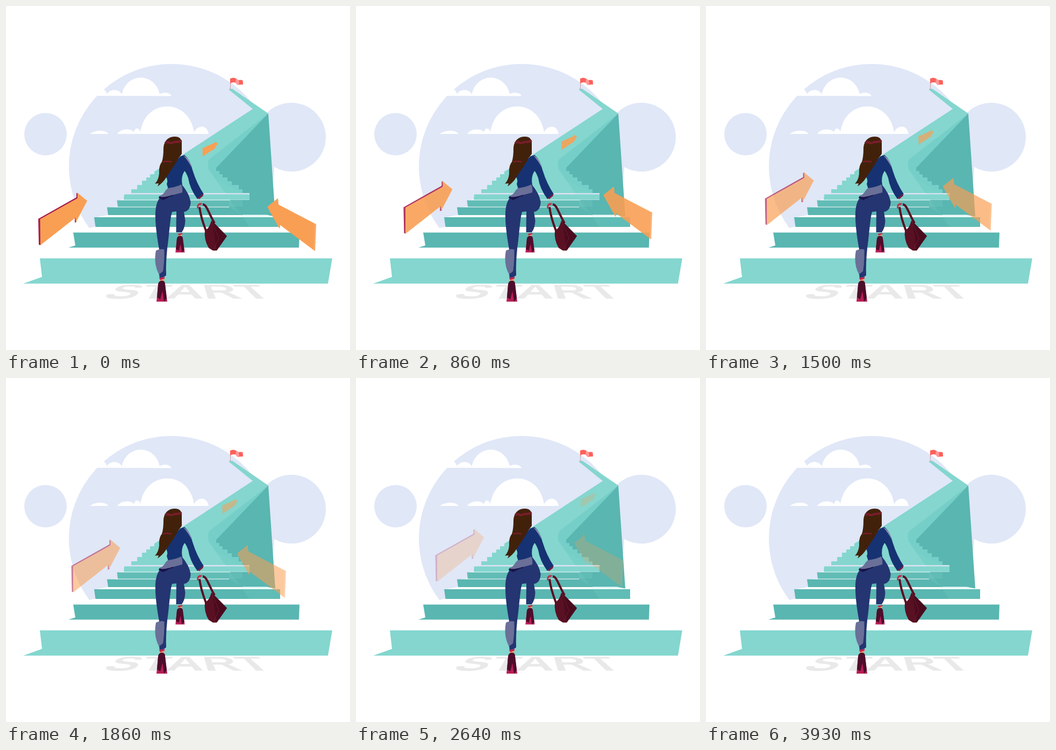
An HTML page for the animation above (4 s loop, 640 by 640 pixels).

```html
<!DOCTYPE html>
<html lang="en">
<head>
<meta charset="utf-8">
<title>Climb</title>
<style>
  html, body { margin: 0; width: 100%; height: 100%; overflow: hidden; background: #fff; }
  svg { position: absolute; left: 0; top: 0; }
  #floor {
    width: 1px; height: 1px; overflow: visible; transform-origin: 0 0;
    transform: translate(339px, 544.5px) matrix3d(1.01,0,0,0, 0,.467,0,-.0037, 0,0,1,0, 0,0,0,1);
    font: bold 100px "Liberation Sans", Arial, sans-serif;
  }
</style>
</head>
<body>
<svg id="floor"><text text-anchor="middle" fill="#e9e9e9">START</text></svg>

<svg width="640" height="640" viewBox="0 0 640 640">
  <!-- sky -->
  <g fill="#e0e7f7">
    <circle cx="73.500" cy="238.500" r="39.500"/>
    <circle cx="531" cy="244" r="64"/>
    <path d="M155 413A191 191 0 1 1 461 413Z"/>
  </g>
  <g fill="#fff">
    <path d="M160 167V155H182Q186 158 188 164C193 154 210 153 215.500 164.500C224 123 277 123 286 164C292 160 304 160 308 167.500Z"/>
    <path d="M156 238C166 230 186 230 190.500 238ZM207 238C212 229 231 226 238 234.500C240 226 247 225 250 234C260 171 340 171 350 234.500C357 221 374 220 377 238Z"/>
  </g>

  <!-- ramp and wall -->
  <path fill="#84d6cf" d="M415 154H421L488 200L440 348H233V341H244V333H253V325H261V319H268V313H276V308L330 276L459 191.500L415 156Z"/>
  <path fill="#75cfc8" d="M488 200L378 285Q374 292 377 304L408 348H453V300Z"/>
  <path fill="#59b6b1" d="M488 200L501 391.500L485 389H415V361H453V348H440V341H433V333H420V326H412V319H403V313H397V307H391V301Z"/>

  <!-- steps -->
  <path fill="#fff" d="M233 348.500H440V350H453V361H417V374.500H415V389H485L510 393.500V411H546V422H607V470H63L125 421L154 413L164 393L188 389V375L207 373V361L220 360V350Z" opacity="0"/>
  <path fill="#e0e0ef" d="M233 348.500H440V350.500H231Z"/>
  <path fill="#fff" d="M220 359.500H417V362H207ZM207 373H415V375.500H188ZM190 388.500H485L510 394H164ZM166 410.500H510L546 422H125L155 413Z"/>
  <path fill="#82d5ce" d="M220 350.500H453V360.500H219Z"/>
  <path fill="#62bcb6" d="M206.500 361.500H440V373.500H208Z"/>
  <path fill="#59b6b1" d="M188 374.500H440V389H190ZM164 393H510V411H166.500ZM125 421.500H546L545 449.500H116L129 445.500Z"/>
  <path fill="#84d6cf" d="M63 469.500H607L599 516.500H32L67 504Z"/>
  <path fill="#84d6cf" opacity=".16" d="M391 324L408 348L417 361L440 393L453 411H510V393L501 391.500L485 389H440L415 374V361H453V348H440Z"/>

  <!-- flag -->
  <path stroke="#c9a0a8" d="M417.500 135V155"/>
  <path fill="#fd605a" d="M417 135Q423 132 428 135L431 138.500Q436 136.500 440.500 138.500L441 146Q436 146 431 147L427 142.500Q422 141 417 144Z"/>
  <path fill="#f99" d="M428 135L433 138L434 147L431 147L427 142.500Z"/>

  <!-- arrows -->
  <g id="left">
    <path fill="#a81c4d" d="M60 396L131 356V348L134 348L133 358L64 397V445L61 444ZM128 393L132 391L131 402L128 403Z"/>
    <path fill="#f99f53" d="M63.500 396.500L133.500 357.500L132.500 347L151 362.500L130 402.500L129 394L64 445Z"/>
  </g>
  <g id="right">
    <path fill="#f99f53" d="M486 373.500L506 357.500L507 369.500L577 406L575 456L510 407.500L509 414.500Z"/>
    <path fill="none" stroke="#fbb478" d="M575 406L573.500 454"/>
  </g>
  <path id="far" fill="#f99f53" d="M365.500 264.500L388 254.500L389 252L394 256L387 267L386 266.500L366 280Z"/>

  <!-- legs -->
  <g fill="#243571">
    <path d="M309 352H328Q339 352 343 366C343 377 338 382 331 383L333.500 399Q333 413 327 421H316.500L317 382Z"/>
    <path d="M286 357C294 351 320 352 340 356L343 366Q340 379 328 381L309 383C305 395 304 425 300 451Q297 480 298 501L287 508L285 453C281 430 277 404 278 383Q279 366 286 357Z"/>
    <path d="M327 332Q341 349 343.500 364Q344 377 331 382L300 356Z"/>
  </g>
  <path fill="#6a7098" d="M279 455Q287 451 294.500 453Q295 480 291 500L285 500Q274 480 279 455Z"/>
  <path fill="#243571" d="M285 499L297 490V502L286 508Z"/>

  <!-- shoes -->
  <g id="shoe">
    <path fill="#f79c62" d="M286 506L295 504L294 512H287Z"/>
    <path fill="#c2224f" d="M285 506L295 504V507L287 510Z"/>
    <path fill="#b81e56" d="M283 519Q284 511 290 511Q296 511 296 518L300 550H280Z"/>
    <path fill="#4c0e2b" d="M283 518Q284 511 290 511Q296 511 296 518L299 544L294 550L291 530L287 546L281 542Z"/>
  </g>
  <use href="#shoe" transform="translate(74.500 23) scale(.86 .792)"/>

  <!-- jacket -->
  <path fill="#163272" d="M324 280L332 277Q342 285 347 305Q355 331 368 350L356 359Q342 340 339 320Q335 309 332 307Q325 318 328 333L302 341L299 331Q302 326 298 318L308 298Z"/>
  <path fill="#868bad" d="M330 278Q341 282 345 300Q339 288 330 278Z"/>
  <path fill="#1a1248" d="M286 353L312 350Q300 358 292 361L284 357Z"/>
  <path fill="#6a7098" d="M301 339Q317 337 326 332Q329 338 328 347Q312 351 303 354Q292 357 285 354Q293 351 297 343Z"/>
  <path fill="none" stroke="#1a1248" stroke-width="1.500" d="M284.500 356Q293 358 311 352"/>
  <path fill="#7d1a3c" d="M356 358L366 350L367 353L360 359Z"/>

  <!-- hand and bag -->
  <path fill="none" stroke="#c9a6a2" d="M360 360L363 367"/>
  <path fill="#b9344e" d="M356 370Q359 365 365 367L363 370L359 371L357 378L355 375Z"/>
  <g fill="none" stroke="#591023" stroke-width="4">
    <path d="M360 374Q362 392 372 418"/>
    <path d="M366 369C374 370 376 384 388 404"/>
  </g>
  <path fill="#591023" d="M382 399L411 428L392 455L385 455L377 450Q368 435 370 417Q378 415 382 399Z"/>
  <path fill="#470b1d" d="M384 400L411 428L392 455Z" opacity=".8"/>
  <path fill="none" stroke="#7c2136" stroke-width=".700" d="M383 400L396 432L386 454"/>

  <!-- hair -->
  <path fill="#42210b" d="M293 264C294 250 303 243 314 243Q327 243 327 256V275Q321 282 316 292Q307 306 298 319Q292 329 282 335.500L284 330L277 330.500Q284 324 285 311Q284 297 290 290Q293 281 293 264Z"/>
  <g fill="none" stroke="#7a1d2b">
    <path stroke-width="4" d="M296 255Q300 252 303 254T311 254T319 253L327 251"/>
    <path stroke-width="2.500" d="M292 290Q299 288 308 290"/>
  </g>
</svg>

<script>
  const LOOP = 4000, FPS = 14;
  // x and y drift in px per ms
  const arrows = [
    ["left", .0331, -.0251],
    ["right", -.0303, -.0253],
    ["far", .0198, -.0147]
  ].map(([id, vx, vy]) => ({ el: document.getElementById(id), vx, vy }));

  function draw(time) {
    const t = Math.floor((time % LOOP + 5) * FPS / 1000) * 1000 / FPS;
    const fade = t > 3530 ? 0 : (1 + Math.cos(Math.PI * t / LOOP)) / 2;
    for (const { el, vx, vy } of arrows) {
      el.setAttribute("transform", `translate(${vx * t} ${vy * t})`);
      el.setAttribute("opacity", fade);
    }
  }

  const start = performance.now();
  function tick() {
    draw(performance.now() - start);
    requestAnimationFrame(tick);
  }
  tick();
</script>
</body>
</html>
```
